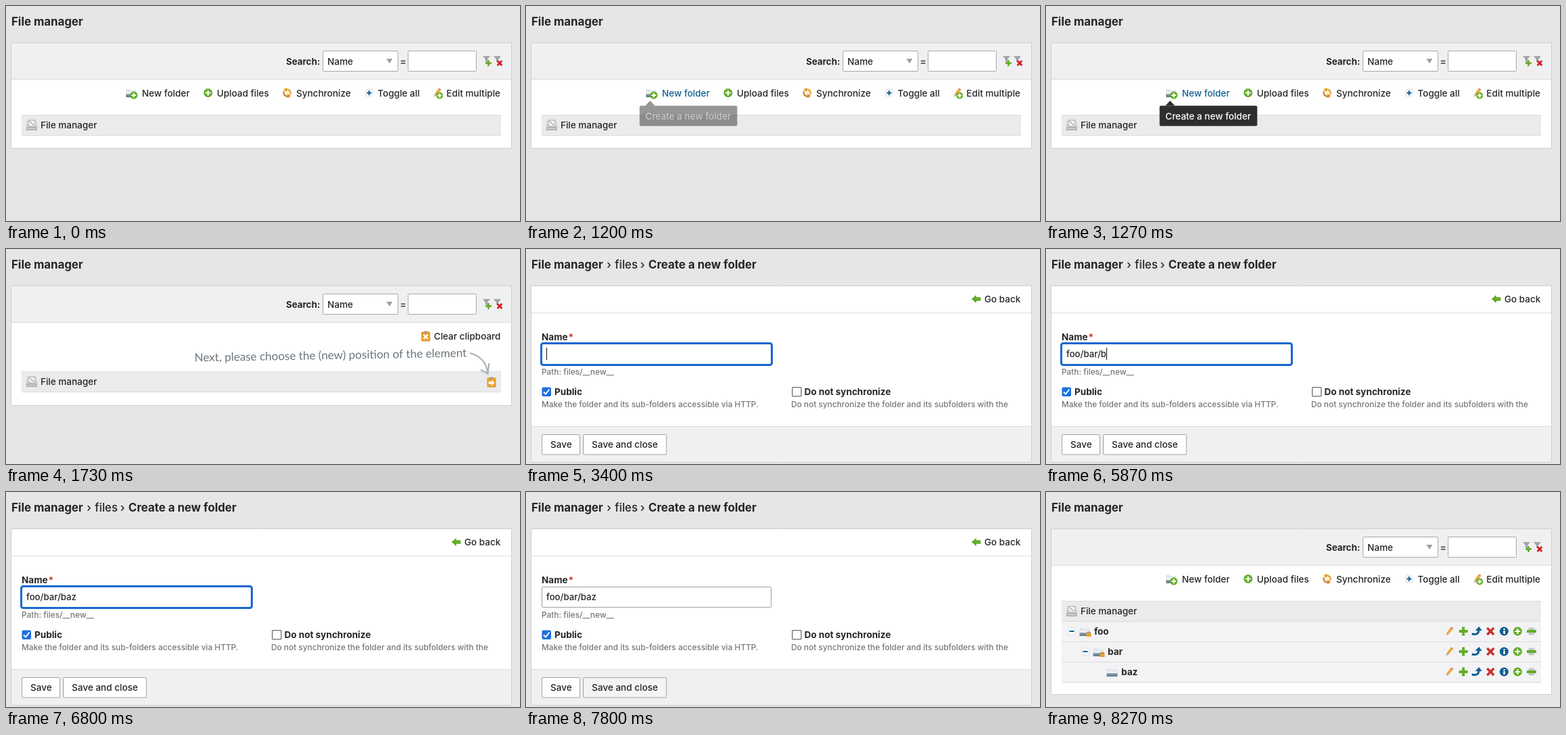
Recreate the animation shown at these times as an HTML page with a canvas. Size 758x318 px, loop 9870 ms.

```html
<!DOCTYPE html>
<html lang="en">
<head>
<meta charset="utf-8">
<title>File manager</title>
<style>
html, body { margin: 0; width: 758px; height: 318px; overflow: hidden; background: #e6e6e8; }
canvas { display: block; }
</style>
</head>
<body>
<canvas id="stage" width="758" height="318"></canvas>
<script>
const ctx = document.getElementById('stage').getContext('2d');
const LOOP = 9870;
const SANS = 'Inter, Roboto, sans-serif';
const INK = '#252525', BLUE = '#0f5f91', GREEN = '#63ad28', ORANGE = '#eba12c';
const RED = '#c9302c', LINE = '#dcdcde', GRAY = '#777779';

// Moments at which the name field grows by one character.
const KEYS = [3930, 4070, 4270, 4670, 4870, 5070, 5270, 5600, 5870, 6070, 6200];
const NAME = 'foo/bar/baz';
const CARET_OFF = [[3870, 3930], [4530, 4670], [6800, 7400]];

function text(str, x, y, { size = 13.5, weight = 500, color = INK } = {}) {
  ctx.font = `${weight} ${size}px ${SANS}`;
  ctx.fillStyle = color;
  ctx.fillText(str, x, y);
}
const bold = (str, x, y, size = 13.5) => text(str, x, y, { size, weight: 700 });
const small = (str, x, y) => text(str, x, y, { size: 11.85, color: GRAY });

function rect(x, y, w, h, fill) {
  ctx.fillStyle = fill;
  ctx.fillRect(x, y, w, h);
}

function box(x, y, w, h, fill, border, radius = 0, width = 1) {
  ctx.beginPath();
  ctx.roundRect(x + width / 2, y + width / 2, w - width, h - width, radius);
  ctx.fillStyle = fill;
  ctx.fill();
  if (border) {
    ctx.strokeStyle = border;
    ctx.lineWidth = width;
    ctx.stroke();
  }
}

function poly(points, fill) {
  ctx.beginPath();
  points.forEach(([x, y]) => ctx.lineTo(x, y));
  ctx.closePath();
  ctx.fillStyle = fill;
  ctx.fill();
}

function stroke(points, color, width) {
  ctx.beginPath();
  points.forEach(([x, y]) => ctx.lineTo(x, y));
  ctx.strokeStyle = color;
  ctx.lineWidth = width;
  ctx.stroke();
}

function disc(x, y, r, fill) {
  ctx.beginPath();
  ctx.arc(x, y, r, 0, Math.PI * 2);
  ctx.fillStyle = fill;
  ctx.fill();
}

function at(x, y, draw, angle = 0) {
  ctx.save();
  ctx.translate(x, y);
  ctx.rotate(angle);
  draw();
  ctx.restore();
}

function plus(x, y, arm, color, width) {
  rect(x - arm, y - width / 2, arm * 2, width, color);
  rect(x - width / 2, y - arm, width, arm * 2, color);
}

function cross(x, y, arm, color, width) {
  at(x, y, () => plus(0, 0, arm, color, width), Math.PI / 4);
}

function addBadge(x, y, r = 5.5) {
  disc(x, y, r, GREEN);
  plus(x, y, r * 0.6, '#fff', 2);
}

function folder(x, y) {
  at(x, y, () => {
    poly([[0, 1], [6, 1], [7, 3], [15, 2], [15, 8], [0, 8]], '#dde5ec');
    const shade = ctx.createLinearGradient(0, 4, 0, 13);
    shade.addColorStop(0, '#c9d6e0');
    shade.addColorStop(0.5, '#8ba0b0');
    shade.addColorStop(1, '#5f7484');
    rect(0, 6, 16, 7, shade);
    rect(0, 5, 16, 3, '#eef2f5');
  });
}

function lock(x, y) {
  ctx.beginPath();
  ctx.arc(x + 3.5, y + 1, 2.2, Math.PI, 0);
  ctx.strokeStyle = '#c88a24';
  ctx.lineWidth = 1.3;
  ctx.stroke();
  rect(x, y + 1, 7, 5, ORANGE);
}

function pencil(x, y) {
  at(x, y, () => {
    rect(-1.9, -7, 3.8, 2, '#d7825b');
    rect(-1.9, -5, 3.8, 9, ORANGE);
    rect(0.2, -5, 1.7, 9, '#f3bd5a');
    poly([[-1.9, 4], [1.9, 4], [0, 8]], '#b9a78b');
  }, 0.65);
}

function drive(x, y) {
  poly([[x + 2, y], [x + 14, y], [x + 16, y + 11], [x, y + 11]], '#c9c9cb');
  rect(x, y + 11, 16, 5, '#b3b3b5');
  rect(x + 2, y + 13, 12, 1, '#dededf');
  ctx.beginPath();
  ctx.ellipse(x + 8, y + 5.5, 4.5, 3.8, 0, 0, Math.PI * 2);
  ctx.fillStyle = '#f3f3f4';
  ctx.fill();
  stroke([[x + 5, y + 3], [x + 11, y + 8]], '#adadaf', 1.4);
}

function syncIcon(x, y) {
  for (const angle of [0, Math.PI]) {
    at(x, y, () => {
      ctx.beginPath();
      ctx.arc(0, 0, 5, -1.9, 0.45);
      ctx.strokeStyle = angle ? '#d18b2c' : ORANGE;
      ctx.lineWidth = 2.5;
      ctx.stroke();
      poly([[-0.5, -8], [-0.5, -1], [-5.5, -4.5]], angle ? '#d18b2c' : ORANGE);
    }, angle);
  }
}

function toggleIcon(x, y, open) {
  box(x - 6, y - 6, 12, 12, '#f7fafc', '#d9e2ea', 3);
  rect(x - 3.5, y - 1, 7, 2, BLUE);
  if (!open) rect(x - 1, y - 3.5, 2, 7, BLUE);
}

function clipboard(x, y) {
  box(x - 6.5, y - 6.5, 13, 14, ORANGE, '#dd9526');
  rect(x - 3, y - 7.5, 6, 3, '#b59a70');
}

function arrow(x, y, dir, color, s = 1) {
  const d = dir * s;
  poly([[x + 7 * d, y], [x, y - 6 * s], [x, y - 2.8 * s], [x - 6.5 * d, y - 2.8 * s],
    [x - 6.5 * d, y + 2.8 * s], [x, y + 2.8 * s], [x, y + 6 * s]], color);
}

function funnel(x, y) {
  poly([[x, y], [x + 11, y], [x + 7, y + 5], [x + 7, y + 10], [x + 4, y + 8], [x + 4, y + 5]], '#a2a4a6');
}

function moveIcon(x, y) {
  ctx.beginPath();
  ctx.moveTo(x - 7, y + 4);
  ctx.quadraticCurveTo(x + 3, y + 6, x + 3, y - 1);
  ctx.strokeStyle = BLUE;
  ctx.lineWidth = 3;
  ctx.stroke();
  poly([[x + 3.5, y - 7], [x + 8, y - 1], [x - 2, y - 1]], BLUE);
}

function rowActions(y) {
  pencil(595, y);
  plus(615.5, y, 6.5, GREEN, 4);
  moveIcon(635, y);
  cross(655.5, y, 7, RED, 3.4);
  disc(675.5, y, 6.5, BLUE);
  rect(674.5, y - 4, 2.5, 2, '#fff');
  rect(674.5, y - 1, 2.5, 5, '#fff');
  addBadge(695.5, y, 6.5);
  box(711, y - 6, 10, 12, '#c4c6c7', null, 2);
  rect(709, y - 2, 14, 4, GREEN);
}

function panel(bottom) {
  rect(0, 0, 758, 318, '#e6e6e8');
  box(7, 54, 739, bottom - 54, '#fff', '#cfcfd2');
}

function row(y, fill) {
  rect(23, y, 707, 30, fill);
  rect(23, y, 707, 1, LINE);
  rect(23, y + 30, 707, 1, LINE);
}

function listPage(bottom, rootY) {
  panel(bottom);
  bold('File manager', 8, 28.5, 16.8);
  rect(8, 55, 737, 53, '#f0f0f2');
  rect(8, 108, 737, 1, LINE);
  bold('Search:', 413, 86.5, 13.3);
  box(467, 66, 111.5, 31, '#fff', '#a9a9ab', 1);
  text('Name', 474, 86.5);
  poly([[561, 78], [570, 78], [565.5, 85]], '#a0a0a2');
  text('=', 581, 86.5, { size: 14 });
  box(592.5, 66, 101.5, 31, '#fff', '#a9a9ab', 1);
  funnel(703, 74);
  plus(711.5, 84.5, 4.5, GREEN, 2.6);
  funnel(719, 74);
  cross(728, 84.5, 4.8, '#d41f26', 2.8);

  row(rootY, '#ebebed');
  drive(30, rootY + 7);
  text('File manager', 51, rootY + 20);
}

function toolbar(hover) {
  const label = (str, x) => text(str, x, 133.6, { color: hover === str ? BLUE : INK });
  folder(177, 122);
  addBadge(188.5, 132);
  label('New folder', 200.5);
  addBadge(298, 128.5, 6.5);
  label('Upload files', 311);
  syncIcon(414.5, 128.5);
  label('Synchronize', 428);
  toggleIcon(535.5, 128.5, false);
  label('Toggle all', 548);
  pencil(636, 128);
  addBadge(639.5, 132.5, 5);
  label('Edit multiple', 649.5);
}

function tooltip(alpha) {
  ctx.globalAlpha = alpha;
  poly([[176, 147.5], [183, 140], [190, 147.5]], '#2e2e2e');
  box(167, 147, 145, 31, '#2e2e2e', null, 2);
  text('Create a new folder', 176, 168, { color: '#fff' });
  ctx.globalAlpha = 1;
}

function startPage(t) {
  listPage(211, 161);
  toolbar(t < 130 ? '' : t < 200 ? 'Upload files' : 'New folder');
  if (t >= 1200) tooltip(t < 1270 ? 0.5 : 1);
}

function pastePage() {
  listPage(232, 181);
  clipboard(619, 129);
  cross(619, 129.8, 4.5, '#fff', 2.2);
  text('Clear clipboard', 631, 133.6);
  clipboard(716, 197);
  arrow(716, 197.8, 1, '#fff', 0.68);

  at(278, 166.5, () => {
    ctx.font = '17.05px Lato, cursive';
    ctx.fillStyle = '#6d767d';
    ctx.fillText('Next, please choose the (new) position of the element', 0, 0);
  }, -0.0175);

  ctx.beginPath();
  ctx.moveTo(684, 154);
  ctx.quadraticCurveTo(708, 160, 710.5, 184);
  ctx.strokeStyle = '#a9b2b8';
  ctx.lineWidth = 2.2;
  ctx.stroke();
  stroke([[700, 178.5], [710.5, 184.5], [712.5, 169]], '#a9b2b8', 2.2);
}

function nameField(t) {
  const focused = t < 7670;
  if (focused) box(21, 138, 343, 35, '#fff', '#1767cf', 3, 3);
  else box(23, 140, 339, 31, '#fff', '#a0a0a2', 1);

  const typed = NAME.slice(0, KEYS.filter(k => k <= t).length);
  text(typed, 30, 160, { size: 13.2 });
  const hidden = CARET_OFF.some(([from, to]) => t >= from && t < to);
  if (focused && !hidden) {
    rect(30 + Math.round(ctx.measureText(typed).width), 146, 1, 18, '#111');
  }
}

function formPage(t) {
  panel(316);
  bold('File manager', 8, 28.5, 16.8);
  text('›', 119, 28.5, { size: 16.8 });
  text('files', 131, 28.5, { size: 16.8 });
  text('›', 168.5, 28.5, { size: 16.8 });
  bold('Create a new folder', 180.5, 28.5, 16.8);

  rect(8, 94, 737, 1, LINE);
  arrow(664, 74, -1, GREEN);
  text('Go back', 676, 79.3);

  bold('Name', 23, 134.5);
  text('*', 62.5, 134.5, { weight: 700, color: RED });
  nameField(t);
  small('Path: files/__new__', 23, 186);

  box(23, 204, 14.5, 14.5, '#1a6fe0', null, 2);
  stroke([[26, 211.5], [29, 214.5], [34.5, 207.5]], '#fff', 2);
  bold('Public', 42, 216);
  small('Make the folder and its sub-folders accessible via HTTP.', 23, 233.5);
  box(392, 204, 14.5, 14.5, '#fff', '#6c6c6e', 1, 1.3);
  bold('Do not synchronize', 410.5, 216);
  small('Do not synchronize the folder and its subfolders with the', 391, 233.5);

  rect(8, 262, 737, 53, '#f0f0f2');
  rect(8, 262, 737, 1, LINE);
  box(23, 274, 57, 30.5, '#fff', '#a2a2a4', 1);
  text('Save', 36, 294.3);
  box(84, 274, 123.5, 30.5, t >= 7530 ? '#f4f4f5' : '#fff', '#a2a2a4', 1);
  text('Save and close', 97, 294.3);
}

function resultPage() {
  listPage(300, 161);
  toolbar('');
  ['foo', 'bar', 'baz'].forEach((name, i) => {
    const y = 191 + i * 30, x = i * 20, mid = y + 15;
    row(y, '#f3f3f5');
    if (i < 2) toggleIcon(38 + x, mid, true);
    folder(49.5 + x, mid - 6);
    if (i < 2) lock(59.5 + x, mid + 2);
    bold(name, 71 + x, y + 20);
    rowActions(mid);
  });
}

function draw(t) {
  if (t < 1730) startPage(t);
  else if (t < 3400) pastePage();
  else if (t < 7930) formPage(t);
  else resultPage();
}

const start = performance.now();
function tick() {
  draw((performance.now() - start) % LOOP);
  requestAnimationFrame(tick);
}
tick();
</script>
</body>
</html>
```
